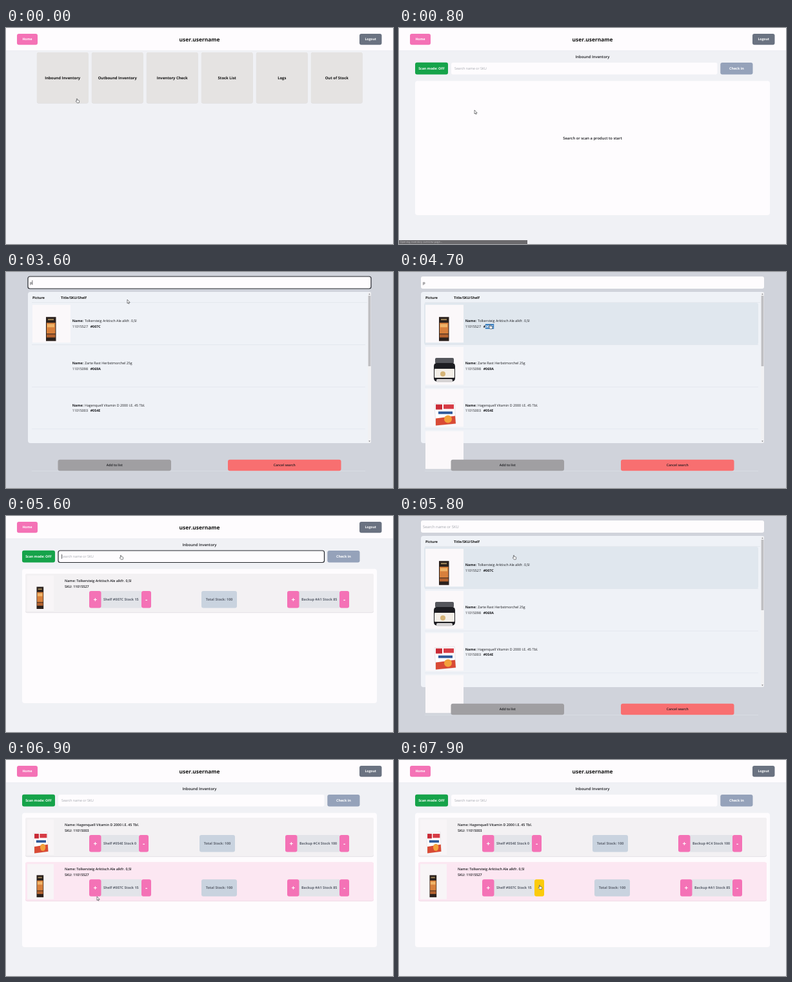
Recreate the animation shown at these times as an HTML page. Size 600 by 337 pixels, loop 8 s.

```html
<!DOCTYPE html>
<html lang="en">
<head>
<meta charset="utf-8">
<title>Inventory check-in</title>
<style>
  html, body { margin: 0; width: 100%; height: 100%; overflow: hidden; background: #f0f1f5; }
  svg { display: block; width: 100vw; height: 100vh; }
  text { font-family: "Open Sans", "Noto Sans", sans-serif; text-rendering: geometricPrecision; white-space: pre; }
</style>
</head>
<body>
<svg id="stage" viewBox="0 0 600 337" preserveAspectRatio="none"></svg>
<script>
const LOOP = 8000, STEP = 100;
const WHITE = '#fefcfe', PINK = '#f472b6', YELLOW = '#fbcb0c', INK = '#17181c';
const stage = document.getElementById('stage');

// Timeline in ms
const INBOUND = 500, FOCUS_1 = 1300, MODAL_1 = 1500, TYPING = 2700, RESULTS = 3600, PICTURES = 3700,
      PICK_1 = 4700, ADDED_1 = 4800, FOCUS_2 = 5600, MODAL_2 = 5800, PICK_2 = 6700, ADDED_2 = 6900;

const pointerPath = [
  [0, 110, 110], [300, 110, 110], [800, 117, 128], [1100, 184, 62], [1500, 184, 62], [1700, 185, 67],
  [2100, 170.5, 31], [2200, 170.5, 31], [2400, 173, 19], [2700, 173, 19], [3000, 188, 43], [3800, 188, 43],
  [4500, 141, 82], [4800, 141, 82], [5500, 178, 61], [5900, 178, 61], [6600, 141, 213], [7000, 141, 213],
  [7800, 218, 195], [LOOP, 218, 195]
];

const products = [
  { name: 'Tolkersteig Arktisch Ale alkfr. 0,5l', sku: '11015527', shelf: '007C', stock: 15, backup: 'A1 Stock 85',
    minusX: 210, totalX: 303, backupX: 436, art: ale },
  { name: 'Zarte Rast Herbstmorchel 25g', sku: '11015098', shelf: '069A', art: jar },
  { name: 'Hagenquell Vitamin D 2000 I.E. 45 Tbl.', sku: '11015003', shelf: '054E', stock: 0, backup: 'C4 Stock 100',
    minusX: 206, totalX: 300, backupX: 433, art: tablets }
];

const between = (v, a, b) => v >= a && v < b;
const inside = (p, x, y, w, h) => between(p.x, x, x + w) && between(p.y, y, y + h);

function rect(x, y, w, h, fill, r = 0, extra = '') {
  return `<rect x="${x}" y="${y}" width="${w}" height="${h}" rx="${r}" fill="${fill}" ${extra}/>`;
}

function text(x, y, label, size = 5.3, fill = INK, weight = 400, anchor = 'start') {
  return `<text x="${x}" y="${y}" font-size="${size}" fill="${fill}" font-weight="${weight}" text-anchor="${anchor}">${label}</text>`;
}

function button(x, y, w, h, fill, label, size = 5.2, color = '#fff', weight = 700) {
  return rect(x, y, w, h, fill, 3) + text(x + w / 2, y + h / 2 + size * 0.36, label, size, color, weight, 'middle');
}

function field(x, y, w, h, size, focused, value = '', caret = focused) {
  const border = focused ? 'stroke="#24262c" stroke-width="1.2"' : '';
  const left = x + (h > 18.8 ? 3 : 5), middle = y + h / 2;
  const caretX = left + (value ? 3.6 : 0);
  return rect(x, y, w, h, WHITE, 3, border)
    + text(left, middle + size * 0.36, value || 'Search name or SKU', size, value ? INK : '#a3a6ad')
    + (caret ? rect(caretX, middle - 3.6, 0.6, 7.2, INK) : '');
}

// Product pictures on a 59 x 59 tile
function ale() {
  return rect(21, 19, 15.5, 37.5, '#2b211d') + rect(22, 28, 13.5, 17, '#d8803c')
    + rect(23, 30, 11, 5, '#f0b468') + rect(22, 46, 13.5, 5, '#b3622f') + rect(24, 22, 9, 2, '#a58b5c');
}
function jar() {
  return rect(15, 17, 29, 9, '#55565c', 2) + rect(13, 25, 33, 29, '#1d1d22', 5)
    + rect(14, 34, 31, 14, '#f4efe8', 1) + '<circle cx="27" cy="42" r="4" fill="#d5b478"/>'
    + rect(17, 50, 25, 5, '#d5d2d3', 2);
}
function tablets() {
  return '<path d="M14 23 45 21 47 54 16 57Z" fill="#fff" stroke="#d6d3d8" stroke-width=".6"/>'
    + rect(16, 24, 10, 8, '#c92a36') + rect(28, 24, 16, 7, '#d63b44') + rect(20, 35, 22, 4, '#2d5799')
    + '<path d="M16 46 46 42 47 54 16 57Z" fill="#d94a35"/><circle cx="35" cy="47" r="6" fill="#f3a13b"/>';
}

function pointerAt(t) {
  const i = pointerPath.findIndex(key => key[0] > t);
  const [t0, x0, y0] = pointerPath[i - 1], [t1, x1, y1] = pointerPath[i];
  const u = (t - t0) / (t1 - t0), k = u * u * (3 - 2 * u);
  return { x: x0 + (x1 - x0) * k, y: y0 + (y1 - y0) * k };
}

function drawPointer({ x, y }, kind) {
  const shapes = {
    arrow: 'M0 0V6L1.4 4.9 2.2 6.7 3.1 6.3 2.3 4.5H4.2Z',
    hand: 'M-.6.5Q0-.4.6.5V2.4L3.2 3Q3.9 3.3 3.8 4L3.2 6.8H.2L-1.8 4.2Q-1.6 3.4-.6 4.1Z',
    beam: 'M-1-3H1M0-3V3M-1 3H1'
  };
  return `<path transform="translate(${x} ${y})" d="${shapes[kind]}" fill="#fff" stroke="#333438" stroke-width=".6"/>`;
}

function header() {
  return rect(0, 0, 600, 337, '#f0f1f5') + rect(0, 0, 600, 35.5, '#e8e9ee') + rect(0, 0, 600, 35, WHITE)
    + button(17, 9, 32, 17.3, PINK, 'Home', 5.1) + button(548, 9, 34.5, 17.3, '#6a7281', 'Logout', 5.1)
    + text(300, 21, 'user.username', 8.4, '#111', 700, 'middle');
}

function homePage() {
  return header() + ['Inbound Inventory', 'Outbound Inventory', 'Inventory Check', 'Stock List', 'Logs', 'Out of Stock']
    .map((label, i) => rect(47.8 + i * 85, 38, 79.9, 79.7, '#dcdbdc', 3)
      + button(48 + i * 85, 38, 79.5, 79.2, '#e5e3e2', label, 5.9, '#111')).join('');
}

function stockControl(x, minusX, y, label, p) {
  const key = (kx, w, sign) =>
    button(kx, y, w, 26.5, inside(p, kx, y, w, 26.5) ? YELLOW : PINK, sign, 10);
  return rect(x + 18, y, minusX - x - 18, 26.5, '#e2e4e9') + key(x, 18.5, '+') + key(minusX, 15, '-')
    + text(x + 22, y + 15.2, label, 5.4, '#5b616d', 700);
}

function listItem(product, y, p) {
  const hot = inside(p, 30, y, 540, 61), top = y + 27;
  return rect(30, y + 0.6, 540, 60.6, hot ? '#f3dce8' : '#e6e4e8', 3)
    + rect(30, y, 540, 60, hot ? '#fce7f2' : '#f3f1f3', 3)
    + rect(33, y + 3, 41, 55, '#f8f5f7')
    + `<g transform="translate(33 ${y + 3}) scale(.69 .92)">${product.art()}</g>`
    + text(91, y + 13.2, 'Name: ' + product.name, 5.35, INK, 600)
    + text(91, y + 22, 'SKU: ' + product.sku, 5.35, INK, 600)
    + stockControl(129, product.minusX, top, `Shelf #${product.shelf} Stock ${product.stock}`, p)
    + button(product.totalX, top, 55, 26.5, '#c9d3df', 'Total Stock: 100', 5.4, '#5b616d')
    + stockControl(product.backupX, 517, top, 'Backup #' + product.backup, p);
}

function inboundPage(t, p) {
  const focused = between(t, FOCUS_1, MODAL_1) || between(t, FOCUS_2, MODAL_2);
  const list = t >= ADDED_2 ? [products[2], products[0]] : t >= ADDED_1 ? [products[0]] : [];
  return header()
    + text(300, 46.7, 'Inbound Inventory', 5.9, INK, 600, 'middle')
    + button(25, 53.7, 51, 18.7, '#16a34a', 'Scan mode: OFF')
    + field(81, 54, 412.5, 18.5, 5.26, focused)
    + button(498.3, 54, 50.2, 18.5, '#95a2ba', 'Check in', 5.4)
    + rect(25, 82.5, 550, 209.5, WHITE, 4)
    + (list.length ? list.map((item, i) => listItem(item, 90 + i * 69.2, p)).join('')
      : text(300, 174, 'Search or scan a product to start', 5.84, INK, 600, 'middle'))
    + (t < 1100 ? rect(0, 331, 199, 6, '#6b6a6d') + text(1.5, 335.4, 'Opening inventory overview page...', 4, '#c4c3c6') : '');
}

function resultRow(i, t, p) {
  const y = 48 + i * 65.7, product = products[i];
  const pictured = i === 0 || t >= PICTURES;
  const hot = p.y < 267 && inside(p, 39, y, 518, 65.7);
  const picked = hot && (between(t, PICK_1, ADDED_1) || between(t, PICK_2, ADDED_2));
  let out = hot ? rect(39, y, 518, 65.3, '#e0e7ee', 3) : '';
  out += rect(40, y + 65.2, 517, 0.6, '#dde2e9');
  if (pictured) out += rect(41, y + 3.2, 59, 59, '#fbf8fa');
  if (!product) return out;
  if (pictured) out += `<g transform="translate(41 ${y + 3.2})">${product.art()}</g>`;
  out += text(102.7, y + 30.3, 'Name:', 5.3, INK, 700) + text(122, y + 30.3, product.name)
    + text(102.7, y + 39, product.sku) + text(130.7, y + 39, '#' + product.shelf, 5.3, INK, 700);
  if (picked) out += rect(133.8, y + 33, 13.4, 7.8, '#3b7fc0') + text(134, y + 39, product.shelf, 5.3, '#fff', 700);
  return out;
}

function searchModal(t, p) {
  const focused = between(t, TYPING, 4500);
  const caret = focused && (t < 3200 || t >= RESULTS) && !between(t, 4100, 4500);
  let out = rect(0, 0, 600, 337, '#d0d3db')
    + field(34, 7, 532, 19, 5.9, focused, between(t, RESULTS, ADDED_1) ? 'p' : '', caret)
    + rect(34, 31, 532, 236, '#eff2f7', 4)
    + text(41, 41.5, 'Picture', 5.3, '#111', 700) + text(85, 41.5, 'Title/SKU/Shelf', 5.3, '#111', 700)
    + rect(40, 47.3, 520, 0.6, '#dde2e9');
  if (t >= RESULTS) {
    out += `<g clip-path="inset(0 0 70px 0 view-box)">${[0, 1, 2, 3].map(i => resultRow(i, t, p)).join('')}</g>`
      + rect(561, 31.5, 5, 235, '#f1f1f3', 1) + rect(561.6, 37, 3.8, 110, '#bfbfc2')
      + '<path d="M562.2 35.2l1.3-1.6 1.3 1.6zM562.2 263.3l1.3 1.6 1.3-1.6z" fill="#77777b"/>';
  }
  return out + button(80.5, 292.8, 175.5, 17.4, '#a09fa2', 'Add to list', 5.1, INK, 600)
    + button(344, 292.8, 175.5, 17.4, '#f86f70', 'Cancel search', 5.1, INK, 600);
}

function render(t) {
  const p = pointerAt(t);
  const modal = between(t, MODAL_1, ADDED_1) || between(t, MODAL_2, ADDED_2);
  let kind = 'arrow', page;
  if (t < INBOUND) {
    kind = 'hand';
    page = homePage();
  } else if (modal) {
    if (inside(p, 34, 7, 532, 19)) kind = 'beam';
    else if (t >= RESULTS && p.y > 48) kind = 'hand';
    page = searchModal(t, p);
  } else {
    if (inside(p, 81, 54, 412, 18.5) || inside(p, 210, 186, 15, 27)) kind = 'hand';
    page = inboundPage(t, p);
  }
  stage.innerHTML = page + drawPointer(p, kind);
}

let shown = -1;
function tick() {
  const t = Math.floor(performance.now() % LOOP / STEP) * STEP;
  if (t !== shown) render(shown = t);
  requestAnimationFrame(tick);
}
tick();
</script>
</body>
</html>
```
